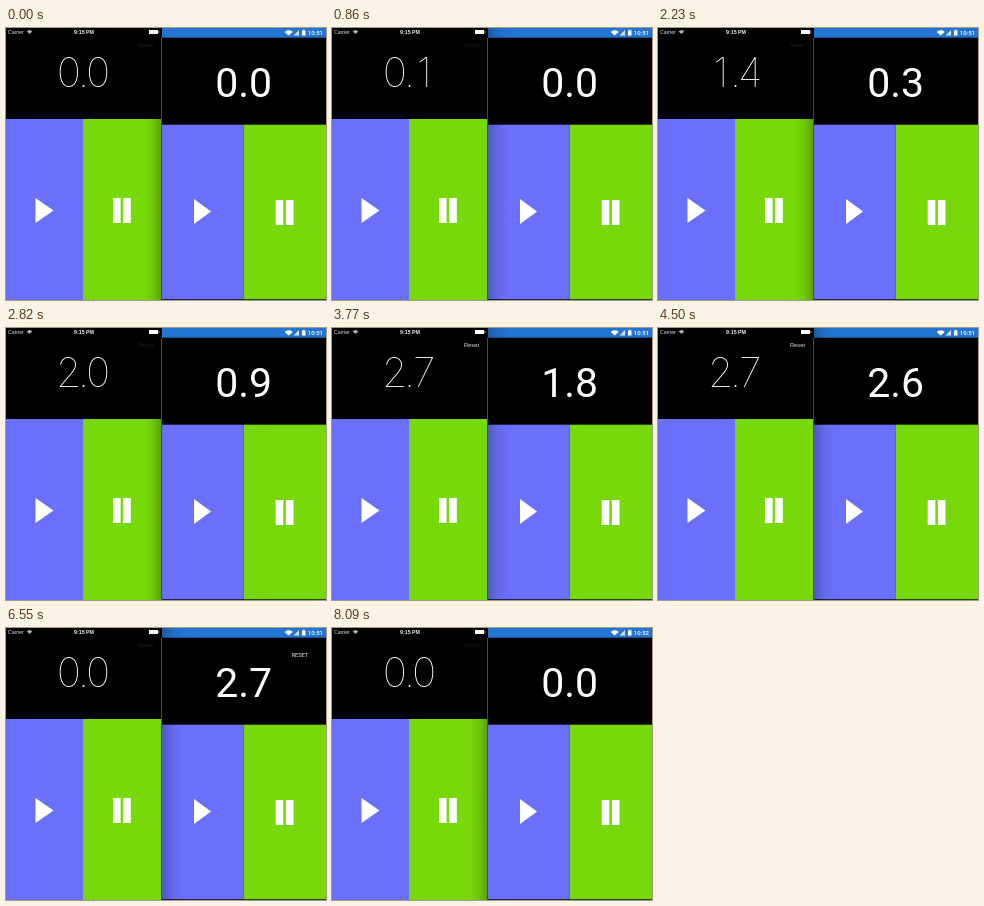
These frames come from a looping animation (320 by 272 pixels, 8130 ms). An HTML page with a canvas:

```html
<!DOCTYPE html>
<html lang="en">
<head>
<meta charset="utf-8">
<title>Two stopwatches</title>
<style>
html, body { margin: 0; width: 100%; height: 100%; overflow: hidden; background: #000; }
canvas { display: block; width: 320px; height: 272px; }
</style>
</head>
<body>
<canvas width="320" height="272"></canvas>
<script>
const ctx = document.querySelector('canvas').getContext('2d');
const LOOP = 8130;
const BLUE = '#6a70fa', GREEN = '#78d90a', WHITE = '#fff';

// Press times in ms for each phone
const ios = { start: 760, stop: 3520, reset: 5860 };
const android = { start: 1895, stop: 4680, reset: 6880 };
const CLOCK_TICK = 7820;

function rect(x, y, w, h, color) {
  ctx.fillStyle = color;
  ctx.fillRect(x, y, w, h);
}

function shape(points, color = WHITE) {
  ctx.fillStyle = color;
  ctx.beginPath();
  points.forEach(([x, y]) => ctx.lineTo(x, y));
  ctx.fill();
}

function text(str, x, y, font, color = WHITE, align = 'center') {
  ctx.font = font;
  ctx.fillStyle = color;
  ctx.textAlign = align;
  ctx.fillText(str, x, y);
}

function wifi(x, y, r, color) {
  ctx.fillStyle = color;
  ctx.beginPath();
  ctx.moveTo(x, y);
  ctx.arc(x, y, r, -Math.PI * 0.77, -Math.PI * 0.23);
  ctx.fill();
}

function shade(from, to, top, alpha) {
  const g = ctx.createLinearGradient(from, 0, to, 0);
  g.addColorStop(0, 'rgba(0,0,0,0)');
  g.addColorStop(0.5, `rgba(0,0,0,${alpha * 0.3})`);
  g.addColorStop(1, `rgba(0,0,0,${alpha})`);
  rect(Math.min(from, to), top, Math.abs(to - from), 272 - top, g);
}

function reading(t, { start, stop, reset }) {
  if (t < start || t >= reset) return '0.0';
  return (Math.floor((Math.min(t, stop) - start) / 100) / 10).toFixed(1);
}

const canReset = (t, watch) => t >= watch.stop && t < watch.reset;

function playIcon(x, y, w) {
  shape([[x, y], [x + w, y + 12.5], [x, y + 25]]);
}

function pauseIcon(x, y) {
  rect(x, y, 7.6, 25, WHITE);
  rect(x + 10.2, y, 7.6, 25, WHITE);
}

function drawIos(t) {
  rect(0, 91, 77, 181, BLUE);
  rect(77, 91, 78, 181, GREEN);

  text('Carrier', 2, 6, '5.2px "Liberation Sans", sans-serif', '#ddd', 'left');
  wifi(23.5, 6, 3.8, '#aaa');
  text('9:15 PM', 78, 6, 'bold 5.3px "Liberation Sans", sans-serif', '#eee');
  rect(143, 2, 9, 4, WHITE);
  rect(152.5, 3.2, 0.8, 1.6, WHITE);

  // Digits keep a fixed pitch
  [...reading(t, ios)].forEach((char, i) =>
    text(char, 62.8 + i * 14.7, 59, '100 41px Inter, sans-serif'));
  text('Reset', 139.5, 19, '5.8px "Liberation Sans", sans-serif',
    canReset(t, ios) ? '#ddd' : '#1d1d1d');
  playIcon(29.5, 170, 18);
  pauseIcon(107, 170);
}

function drawAndroid(t) {
  rect(156, 0, 164, 97, '#000');
  rect(156, 0, 164, 9.7, '#2275d2');
  rect(156, 96.7, 81.7, 174.6, BLUE);
  rect(237.7, 96.7, 82.3, 174.6, GREEN);

  wifi(282.7, 7.5, 5.3, WHITE);
  shape([[287.5, 7.5], [293, 2], [293, 7.5]], '#cfe0f5');
  rect(296, 2.5, 3.5, 5, WHITE);
  rect(297, 1.8, 1.5, 1, WHITE);
  text(t < CLOCK_TICK ? '10:51' : '10:52', 317, 7, '500 6px Roboto, sans-serif', WHITE, 'right');

  text(reading(t, android), 237.7, 69, '400 41px Roboto, sans-serif');
  if (canReset(t, android)) {
    text('RESET', 294, 29, '5.8px Roboto, sans-serif', '#eee');
  }
  playIcon(188, 171, 17);
  pauseIcon(269.7, 172);
}

// The phone pressed last is in front and casts its shadow on the other
const iosInFront = t =>
  ['start', 'stop', 'reset'].some(press => t >= ios[press] && t < android[press]);

function draw(t) {
  rect(0, 0, 320, 272, '#000');
  drawIos(t);
  drawAndroid(t);
  rect(155, 10, 1, 262, '#4a4a4a');
  if (iosInFront(t)) {
    shade(176, 156, 0, 0.22);
  } else {
    shade(137, 155, 10, 0.25);
  }
}

function frame() {
  draw(performance.now() % LOOP);
  requestAnimationFrame(frame);
}
frame();
</script>
</body>
</html>
```
